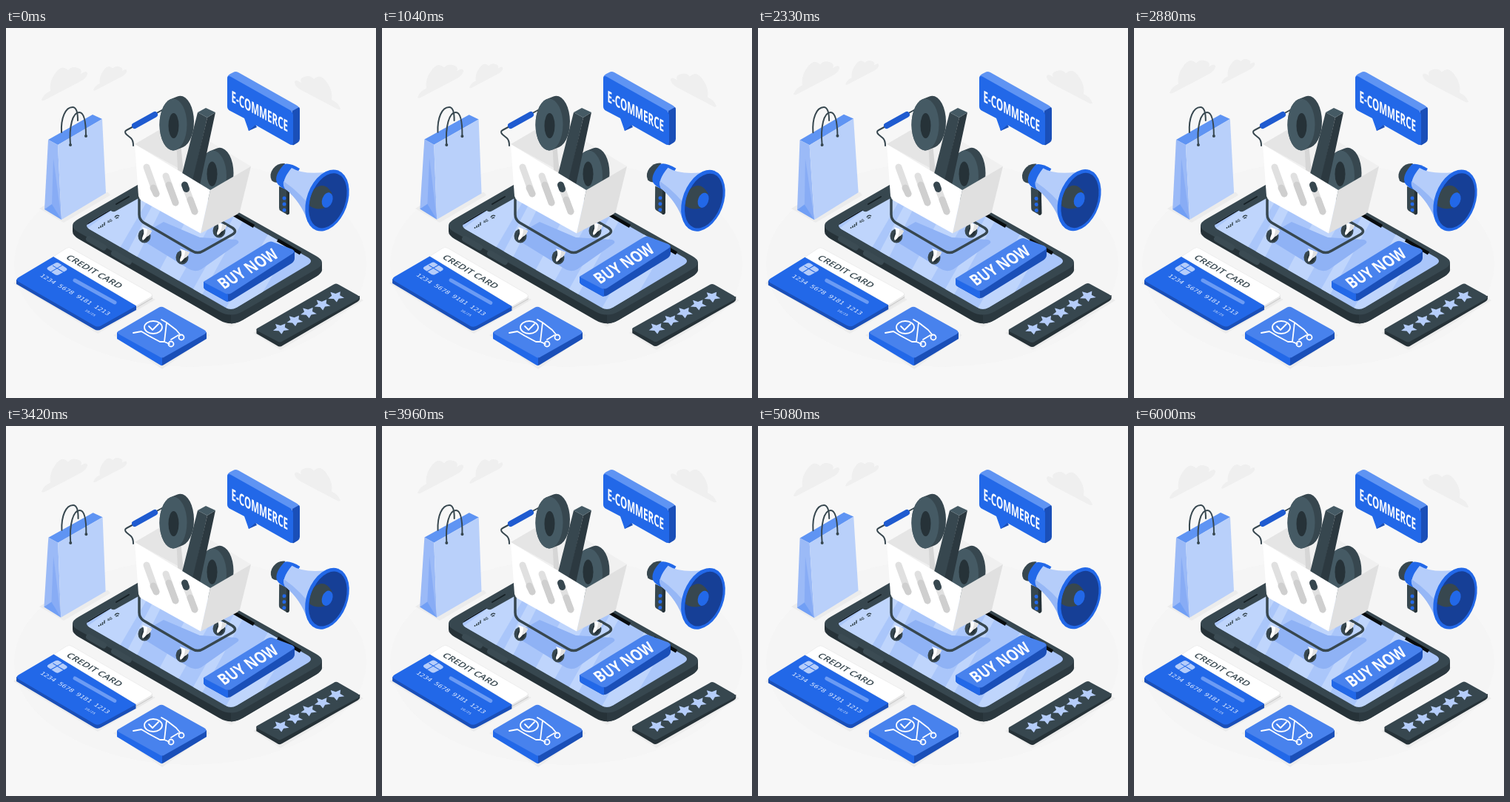
These frames come from a looping animation (500x500 px, 6.04 s). An HTML page:

```html
<!DOCTYPE html>
<html lang="en">
<head>
<meta charset="utf-8">
<title>E-commerce</title>
<style>
html, body { margin: 0; width: 100%; height: 100%; overflow: hidden; background: #f7f7f7; }
svg { display: block; width: 100%; height: 100%; }
text { font-family: "Open Sans", "Noto Sans", sans-serif; font-weight: 700; }
.digits { font-family: "DejaVu Sans Mono", monospace; font-weight: 400; }
.blue { fill: #2268e8; }
.deep { fill: #1a4fb8; }
.mid { fill: #5f94f3; }
.light { fill: #4882ed; }
.pale { fill: #b5cdfa; }
.ink { fill: #263238; }
.slate { fill: #37474f; }
.steel { fill: #455a64; }
.white { fill: #fff; }
.shade { fill: #ececec; }
.line { fill: none; stroke: #37474f; stroke-linecap: round; stroke-linejoin: round; }
</style>
</head>
<body>
<svg viewBox="0 0 500 500">
  <defs>
    <path id="cloud" d="M48 97Q52 88 60 85Q58 73 66 62Q75 48 84 57Q89 51 97 54Q104 56 101 62Q110 56 110 62Q109 68 99 73L57 95Q49 100 48 97Z" fill="#efefef"/>
    <path id="screenShape" d="M113 262L208 205Q216 200 224 205L408 310Q416 315 408 320L312 377.500Q304 382 296 377.500L113 272Q105 267 113 262Z"/>
    <clipPath id="screenClip"><use href="#screenShape"/></clipPath>
    <path id="phoneTop" d="M98 258L197 201Q213 192 229 201L419 308Q435 317 419 326L320 383Q304 392 288 383L98 276Q82 267 98 258Z"/>
    <polygon id="star"/>
    <g id="wheel">
      <ellipse class="slate" rx="8.500" ry="9.500"/>
      <ellipse class="ink" cx="1" cy="1" rx="5" ry="6"/>
      <path class="white" d="M-3-12L10-7Q8-1 3 1Q0 5-2 6Q-4 4-2 0Q1-6-3-12Z"/>
      <path d="M10-7Q8-1 3 1Q0 5-2 6Q4 0 4-9Z" fill="#e0e0e0"/>
    </g>
  </defs>

  <ellipse cx="249" cy="319" rx="238" ry="139" fill="#f5f5f5"/>

  <g id="clouds">
    <use href="#cloud"/>
    <use href="#cloud" transform="translate(83 13) scale(.73)"/>
    <use href="#cloud" transform="translate(500 12) scale(-1 1)"/>
  </g>

  <g class="shade">
    <path d="M45 244L60 235L138 222L141 226L78 263Z"/>
    <path d="M10 345L20 338L196 364L202 367L124 413Z"/>
    <path d="M145 415L160 408L262 408L276 415L211 461Z"/>
    <path d="M334 412L350 404L470 361L483 368L371 435Z"/>
    <path d="M88 278L98 272L430 326L304 404Z"/>
  </g>

  <!-- phone -->
  <g>
    <path class="ink" d="M90 267V275Q90 280 98 285L288 394.500Q304 404 320 394.500L419 336Q427 331 427 326V317Z"/>
    <path d="M304 387.500V399.500Q312 399 320 394.500L419 336Q427 331 427 326V317Z" fill="#2c3940"/>
    <use href="#phoneTop" class="slate"/>
    <g class="line" stroke-width="8" style="stroke:#3b4b53">
      <path d="M112 285L132 296.500M146 304.500L166 316"/>
    </g>
    <use href="#screenShape" fill="#aac6fa"/>
    <g clip-path="url(#screenClip)">
      <g fill="#bfd5fc">
        <path d="M100 278L172 225L196 225L151 302Z"/>
        <path d="M163 305L205 226L219 226L176 312Z"/>
        <path d="M206 330L262 225L299 225L232 344Z"/>
        <path d="M250 358L322 230L337 230L263 364Z"/>
        <path d="M294 384L362 265L391 282L331 384Z"/>
      </g>
      <path d="M183 279L213 262L262 283L311 286Q318 289 311 293L264 326Q255 331 246 325L186 288Q179 283 183 279Z" fill="#8fb2f5"/>
      <path d="M105 267L216 200" fill="none" stroke="#11181c" stroke-width="3"/>
    </g>
    <path class="slate" d="M136 249L141 246Q144 250 149 247L181 229V220L142 240Z"/>
    <path class="line" d="M149 238L166 228" stroke-width="2" style="stroke:#172126"/>
    <path class="line" stroke-width="4.500" style="stroke:#080c0e;stroke-linecap:butt" d="M304 250L335 268M367 286.500L398 304.500"/>
    <g class="line" stroke-width="1.500" style="stroke-linecap:butt">
      <path d="M125.500 271V269M128 270V267M130.500 269V265M133 267V262.500"/>
      <path d="M147 256Q149 252 153 254M148.500 257.500Q150 255.500 152 256.500"/>
    </g>
    <text class="slate" transform="matrix(.87 -.5 .5 .75 138 264)" font-size="5.500">4G</text>
  </g>

  <!-- floating button -->
  <g id="button">
    <path class="deep" d="M267 343V350Q267 352 270 354L295 368Q300 371 305 368L386 318Q390 315 390 311V301Z"/>
    <path class="blue" d="M267 343V350Q267 352 270 354L295 368Q298 370 300 370V360Z"/>
    <path class="light" d="M270 341L353 290Q358 287 363 290L387 299Q392 302 387 305L305 358Q300 361 295 358L270 345Q265 343 270 341Z"/>
    <text class="white" transform="matrix(.775 -.455 .77 .84 294.500 353.500)" font-size="20">BUY NOW</text>
  </g>

  <!-- cart -->
  <g>
    <path class="line" stroke-width="3.500" d="M180 230V252Q180 259 186 263L251 301Q259 306 267 301L306 279Q313 275 306 270L292 262"/>
    <use href="#wheel" x="187" y="281"/>
    <use href="#wheel" x="238" y="310"/>
    <use href="#wheel" x="288" y="274"/>
    <path class="line" stroke-width="2" d="M176 131L163 138Q159 140 163 144L169 149Q172 152 172 159M200 117L209 112Q214 109 214 116L219 140"/>
    <path d="M174 132L201 117" stroke="#1f5bd0" stroke-width="8" stroke-linecap="round"/>
    <path d="M174 157L229 125L331 187L276 219Z" fill="#f0f0f0"/>
    <path d="M174 157L229 125L234 190Z" fill="#e5e5e5"/>
    <path d="M229 125L233 125L240 196L232 192Z" fill="#d6d6d6"/>

    <!-- percent sign -->
    <g transform="translate(226 130.500) scale(1 1.890)">
      <path d="M0 0L9.500-2" stroke="#37474f" stroke-width="37" stroke-linecap="round"/>
      <circle class="steel" r="18.500"/>
      <ellipse class="ink" cx=".5" cy=".8" rx="7" ry="9"/>
    </g>
    <g transform="translate(279.500 200) scale(1 1.860)">
      <path d="M0 0L9.500-2" stroke="#37474f" stroke-width="37" stroke-linecap="round"/>
      <circle class="steel" r="18.500"/>
      <ellipse class="ink" cx="-1" cy="-1.500" rx="7" ry="9"/>
    </g>
    <path class="slate" d="M259 114L272 121L252 210L236 205Z"/>
    <path d="M272 121L283 114L262 212L251 210Z" fill="#2c3940"/>
    <path class="steel" d="M259 114L270 108L283 114L272 121Z"/>

    <path d="M276 219L331 187L316 248Q315 250 312 252L263 277.500Z" fill="#e0e0e0"/>
    <path class="white" d="M174 157L276 219L263 277.500L183 233Q180 231 179 227Z"/>
    <g class="line" stroke-width="9" style="stroke:#e0e0e0">
      <path d="M190 188L203 224M216 200L229 236M242 213L255 248"/>
      <path d="M199 216L203 224M220 212L229 236M249 232L255 248" style="stroke:#cfcfcf"/>
      <path d="M241.500 212L243.500 217.500" style="stroke:#37474f"/>
    </g>
  </g>

  <!-- speech bubble -->
  <g>
    <path class="mid" d="M299 68Q299 64 303 62L307 60Q310 58 314 60L392 104Q397 107 397 110L388 114Z"/>
    <path class="deep" d="M387 112L396 107Q397 108 397 111V150Q397 153 394 155L389 158Q386 159 386 155ZM328 139L339 134L337 130L326 128Z"/>
    <path class="blue" d="M299 69Q299 63 304 66L384 111Q388 114 388 118V154Q388 160 383 157L337 131L328 139L322 122L303 112Q299 110 299 106Z"/>
    <text class="white" transform="matrix(.54 .29 0 1 304.500 99.500)" font-size="21.500">E-COMMERCE</text>
  </g>

  <g id="megaphone">
    <path class="slate" d="M369 214L383 220V250Q382 254 378 251L371 247Q369 246 369 243Z"/>
    <path class="ink" d="M379 218L383 220V250Q382 253 379 252Z"/>
    <g class="blue"><circle cx="376" cy="230" r="2.500"/><circle cx="376" cy="238" r="2.500"/><circle cx="376" cy="246" r="2.500"/></g>
    <path class="slate" d="M377 183Q367 182 361 190Q355 198 359 206Q362 209 367 209Z"/>
    <path class="blue" d="M376 184Q384 182 397 190L380 219Q369 215 366 209Q362 199 376 184Z"/>
    <path class="pale" d="M386 189Q405 201 450 192L408 262Q399 235 377 217Q371 207 386 189Z"/>
    <path d="M377 217Q374 213 375 207Q400 224 418 250L408 262Q399 235 377 217Z" fill="#96b7f6"/>
    <g transform="translate(434 233) rotate(20)">
      <ellipse class="blue" rx="27.500" ry="43"/>
      <ellipse cx="1" rx="23.500" ry="38.500" fill="#163f96"/>
      <path class="slate" d="M-22-8Q-13-24 2-12Q9 0 0 11Q-10 18-20 15Q-24 4-22-8Z"/>
      <ellipse class="blue" cy="-.5" rx="7" ry="10.500"/>
    </g>
  </g>

  <g id="bag">
    <path class="mid" d="M57 151L117 117L130 123L70 158Z"/>
    <path class="line" stroke-width="2" d="M75 141C74 122 80 107 90 107C95 107 97 113 97 125"/>
    <path d="M57 151L70 158L75 259L52 245Z" fill="#9bbaf7"/>
    <path d="M64 176L75 259L62 238Z" fill="#88acf5"/>
    <path class="mid" d="M52 245L62 238L75 259Z" opacity=".7"/>
    <path d="M70 158L130 123L135 223L75 259Z" fill="#b9d0fa"/>
    <path class="line" stroke-width="2" d="M87 158C85 133 90 114 99 114C106 114 108 130 108 146"/>
    <g class="slate"><circle cx="87" cy="158" r="2"/><circle cx="108" cy="146" r="2"/></g>
  </g>

  <g id="card">
    <path class="deep" d="M14 340V346L119 407Q124 410 129 407L176 381V374Z"/>
    <path d="M176 374L198 361V368L176 381Z" fill="#e8e8e8"/>
    <path d="M176 378L198 365" stroke="#bdbdbd" stroke-width=".8"/>
    <path class="white" d="M64 309L81 298Q85 295 89 298L195 358Q200 361 195 364L176 375.500Z" stroke="#e4e4e4" stroke-width=".6"/>
    <path class="blue" d="M64 309L176 375.500L129 402Q124 405 119 402L17 343Q12 340 17 337Z"/>
    <text class="slate" transform="matrix(.95 .54 -.76 .58 80 311)" font-size="12" style="font-weight:600">CREDIT CARD</text>
    <path class="pale" d="M57 323L66 318Q69 316 72 318L81 324Q84 326 81 328L72 333Q69 335 66 333L57 327Q54 325 57 323Z"/>
    <path d="M60 330L77 320M63 321L76 329M71 326L78 330" fill="none" stroke="#2268e8"/>
    <path d="M93 341L147 371" stroke="#6b9bf4" stroke-width="5" stroke-linecap="round"/>
    <g fill="#e5eeff">
      <text class="digits" transform="matrix(.9 .52 -.7 .5 45 335)" font-size="9">1234 5678 9181 1213</text>
      <text class="digits" transform="matrix(.9 .52 -.7 .5 106 382)" font-size="5">10/25</text>
    </g>
  </g>

  <!-- cart tile -->
  <g>
    <path class="blue" d="M150 411V420L206 454Q211 457 211 456V442Z"/>
    <path class="deep" d="M271 411V420L215 454Q212 456 211 456V442Z"/>
    <path class="light" d="M153 409L206 378Q210 375.500 214 378L268 408Q273 411 268 414L215 444Q211 447 207 444L153 414Q148 411 153 409Z"/>
    <g class="line" stroke-width="1.800" style="stroke:#fff">
      <ellipse cx="199" cy="404.500" rx="12" ry="8.500"/>
      <path d="M193 403L198 408L206 400"/>
      <path d="M172 412L183 410L193 416L208 424L214 424L217 398L210 394M217 398L230 408L235 414M214 424L221 427M223 421L233 415"/>
      <circle cx="237" cy="418" r="3.500"/><circle cx="223" cy="427" r="3.500"/>
    </g>
  </g>

  <g id="rating">
    <path class="ink" d="M338.500 407V413L366 429Q370 432 374 429L475 370Q478 368 478 366V362Z"/>
    <path class="slate" d="M341 405L442 347Q446 344 450 347L475 361Q480 364 475 367L374 423Q370 426 366 423L341 410Q336 407 341 405Z"/>
    <g id="stars" class="pale"></g>
  </g>
</svg>
<script>
const $ = id => document.getElementById(id);
const LOOP = 6040, FPS = 24;
const SWAY = 3, BOB = 3, DRIFT = 6; // periods in seconds

const starPoints = Array.from({ length: 10 }, (_, i) => {
  const r = i % 2 ? 5 : 10, a = (i / 5 - 0.5) * Math.PI;
  return `${(r * Math.cos(a)).toFixed(2)},${(r * Math.sin(a)).toFixed(2)}`;
});
$('star').setAttribute('points', starPoints.join(' '));
$('stars').innerHTML = [0, 1, 2, 3, 4].map(i =>
  `<use href="#star" transform="matrix(.87 -.5 .75 .6 ${371.5 + 18.6 * i} ${406 - 10.8 * i})"/>`
).join('');

// Linear rise of 10 units and back over one period.
const float = (s, period) => -10 * (1 - Math.abs(1 - 2 * (s % period) / period));

// Linear sway between +1 and -1 degree, starting at rest.
const sway = (s, period) => 1 - 4 * Math.abs((s / period + 0.25) % 1 - 0.5);

const swaying = { bag: [93, 182], card: [106, 352], megaphone: [410, 230], rating: [408, 388] };

function update(t) {
  // The picture advances in whole steps, with their times rounded to 10 ms.
  const s = Math.floor(t * FPS / 1000 + 0.1) / FPS;
  $('clouds').setAttribute('transform', `translate(0 ${float(s, DRIFT)})`);
  $('button').setAttribute('transform', `translate(0 ${float(s, BOB)})`);
  for (const [id, pivot] of Object.entries(swaying)) {
    $(id).setAttribute('transform', `rotate(${sway(s, SWAY)} ${pivot.join(' ')})`);
  }
}

const start = performance.now();
function tick() {
  update((performance.now() - start) % LOOP);
  requestAnimationFrame(tick);
}
update(0);
requestAnimationFrame(tick);
</script>
</body>
</html>
```
